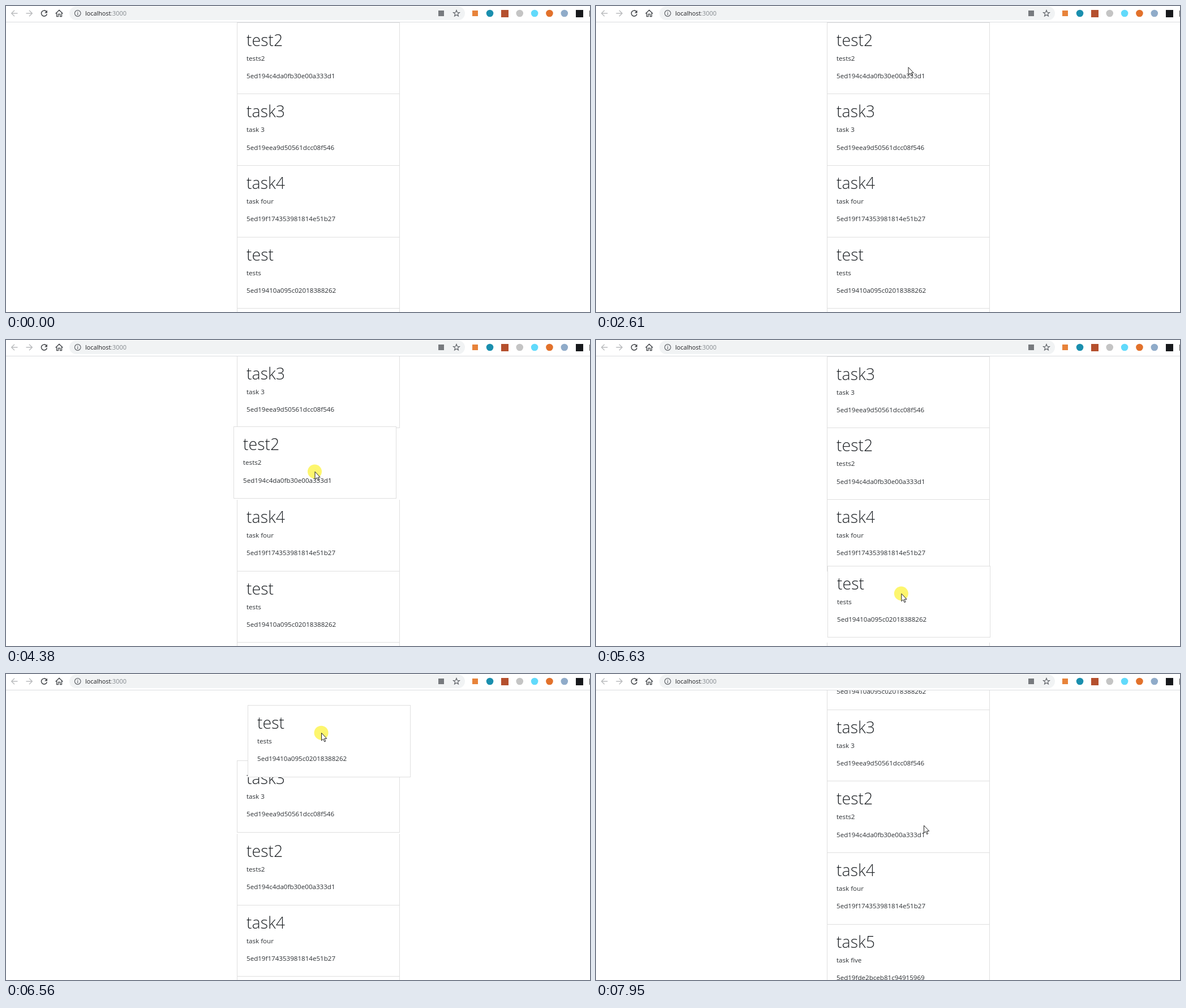
Animation of 1032 by 542 pixels, one loop 8 s. Source, as an HTML page with a canvas:

```html
<!DOCTYPE html>
<html lang="en">
<head>
<meta charset="utf-8">
<title>Sortable task list</title>
<style>
html, body { margin: 0; width: 100%; height: 100%; overflow: hidden; background: #fff; }
canvas { display: block; }
</style>
</head>
<body>
<canvas id="stage" width="1032" height="542"></canvas>
<script>
const ctx = document.getElementById('stage').getContext('2d');
const LOOP = 8000, STEP = 1000 / 13;
const LEFT = 408, TOP = 28.6, PITCH = 126.7, WIDTH = 287;
const SANS = '"Open Sans", "Noto Sans", sans-serif';

const cards = {
  test2: ['test2', 'tests2', '5ed194c4da0fb30e00a333d1'],
  task3: ['task3', 'task 3', '5ed19eea9d50561dcc08f546'],
  task4: ['task4', 'task four', '5ed19f174353981814e51b27'],
  test: ['test', 'tests', '5ed19410a095c02018388262'],
  task5: ['task5', 'task five', '5ed19fde2bceb81c94915969']
};

const key = (t, x, y) => ({ t, x, y });
const path = [
  key(920, 912, 528), key(1700, 533, 341), key(2000, 522, 240), key(2400, 558, 118),
  key(2600, 551.5, 108.2), key(2950, 551.5, 108.2),   // grab the top card
  key(3538, 545.5, 157), key(4385, 545.5, 233), key(4760, 545.5, 233),
  key(5400, 538.5, 458), key(5550, 538.5, 458),       // grab the fourth card
  key(5900, 543, 410), key(6154, 557.5, 174), key(6600, 557, 93),
  key(6840, 557, 93), key(7250, 579, 268)
];

// One phase per list order; shoves maps a slot to the time its card makes room
const phases = [
  { end: 4680, order: ['test2', 'task3', 'task4', 'test', 'task5'],
    slot: 0, press: 2870, lift: 2950, push: -127.4, shoves: { 1: 3780 } },
  { end: 6920, order: ['task3', 'test2', 'task4', 'test', 'task5'],
    slot: 3, press: 5480, lift: 5550, push: PITCH, shoves: { 2: 5900, 1: 6048, 0: 6380 } },
  { end: LOOP, order: ['test', 'task3', 'test2', 'task4', 'task5'],
    press: LOOP, lift: LOOP, shoves: {} }
];

const clamp = v => Math.min(1, Math.max(0, v));

// The screen refreshes 13 times a second
const snap = t => Math.min(Math.floor((t + 15) / STEP) * STEP, LOOP - STEP);

function pointerAt(t) {
  const i = path.findIndex(k => k.t >= t);
  if (i < 0) return path[path.length - 1];
  if (i === 0) return path[0];
  const a = path[i - 1], b = path[i], k = (t - a.t) / (b.t - a.t);
  return { x: a.x + (b.x - a.x) * k, y: a.y + (b.y - a.y) * k };
}

// One notch of the mouse wheel
const notch = (t, from) => 74 * Math.sin(Math.PI / 2 * clamp((t - from) / 150)) ** 2;

// cubic-bezier(.2, 0, 0, 1)
function ease(x) {
  let lo = 0, hi = 1;
  for (let i = 0; i < 24; i++) {
    const s = (lo + hi) / 2;
    if (0.6 * s * (1 - s) ** 2 + s ** 3 < clamp(x)) lo = s; else hi = s;
  }
  return 3 * (1 - lo) * lo * lo + lo ** 3;
}

function text(str, x, y, font, color) {
  ctx.font = font + ' ' + SANS;
  ctx.fillStyle = color;
  ctx.fillText(str, x, y);
}

function rect(x, y, w, h, color) {
  ctx.fillStyle = color;
  ctx.fillRect(x, y, w, h);
}

function disc(x, y, r, color) {
  ctx.fillStyle = color;
  ctx.beginPath();
  ctx.arc(x, y, r, 0, 7);
  ctx.fill();
}

function line(d, color, width) {
  ctx.strokeStyle = color;
  ctx.lineWidth = width;
  ctx.stroke(new Path2D(d));
}

function drawCard(name, x, y, topLine) {
  const l = Math.round(x), t = Math.round(y), b = Math.round(y + PITCH), edge = '#dfdfdf';
  rect(l, t + 1, WIDTH + 1, b - t, '#fff');
  rect(l, t + 1, 1, b - t, edge);
  rect(l + WIDTH, t + 1, 1, b - t, edge);
  rect(l, b, WIDTH + 1, 1, edge);
  if (topLine) rect(l, t, WIDTH + 1, 1, edge);
  const [title, note, id] = cards[name];
  text(title, l + 17, Math.round(y + 42), '300 28.5px', '#212529');
  text(note, l + 17, Math.round(y + 68), '400 11.6px', '#2b2f33');
  text(id, l + 17, Math.round(y + 99.2), '400 11.6px', '#2b2f33');
}

function drawToolbar() {
  rect(0, 0, 1032, 28, '#fff');
  rect(0, 28, 1032, 1, '#dadce0');
  ctx.fillStyle = '#f1f3f4';
  ctx.beginPath();
  ctx.roundRect(112, 1, 699, 24, 12);
  ctx.fill();

  line('M20.5 13H10M15 7.7L9.7 13L15 18.3', '#babcbe', 1.4);
  line('M35.5 13H46M41 7.7L46.3 13L41 18.3', '#babcbe', 1.4);
  line('M71.2 9.6A5 5 0 1 0 72.3 14.2', '#4a4d51', 1.6);
  ctx.fillStyle = '#4a4d51';
  ctx.fill(new Path2D('M73 7.4V12.4H68Z'));
  line('M87.6 13.6L94 7.3L100.4 13.6M89.6 12V18.6H92.4V14.4H95.6V18.6H98.4V12', '#4a4d51', 1.4);
  line('M132 13A5.3 5.3 0 1 1 121.4 13A5.3 5.3 0 1 1 132 13M126.7 12.3V16M126.7 9.9V11.2', '#5f6368', 1.2);

  text('localhost', 140, 17, '400 10.8px', '#202124');
  const w = ctx.measureText('localhost').width;
  text(':3000', 140 + w, 17, '400 10.8px', '#80868b');

  let star = '';
  for (let i = 0; i < 10; i++) {
    const r = i % 2 ? 2.5 : 5.8, a = i * Math.PI / 5 - Math.PI / 2;
    star += (i ? 'L' : 'M') + (796 + r * Math.cos(a)) + ' ' + (13.3 + r * Math.sin(a));
  }
  line(star + 'Z', '#5f6368', 1.2);

  rect(764, 8, 10, 10, '#777a7e');
  const badges = ['#e8833a', '#1a8fae', '#b5502e', '#c4c4c4', '#61dafb', '#e2712b', '#8fabc9', '#17191c'];
  badges.forEach((color, i) => {
    const x = 828.7 + i * 26.35;
    if (i === 0) rect(824, 8, 10, 10, color);
    else if (i === 2 || i === 7) rect(Math.round(x - 6.5), 7, 13, 13, color);
    else disc(x, 13, 6.3, color);
  });
  rect(1031, 8, 1, 11, '#555');
}

function drawPointer({ x, y }, pressed) {
  if (pressed) {
    ctx.globalCompositeOperation = 'multiply';
    disc(x, y, 12.5, '#fdf66e');
    ctx.globalCompositeOperation = 'source-over';
  }
  ctx.save();
  ctx.translate(x, y);
  const arrow = 'M.5 .3V13.8L3.5 10.9L5.7 15.8L7.7 14.9L5.6 10.2H9.7Z';
  ctx.fillStyle = '#fff';
  ctx.fill(new Path2D(arrow));
  line(arrow, '#222', 1);
  ctx.restore();
}

function draw(time) {
  const t = snap(time);
  const phase = phases.find(p => t < p.end);
  const pointer = pointerAt(t);
  const scroll = notch(t, 7258) + notch(t, 7873);
  const lifted = t >= phase.lift;

  rect(0, 0, 1032, 542, '#fff');
  phase.order.forEach((name, i) => {
    if (lifted && i === phase.slot) return;
    const from = phase.shoves[i];
    const shift = from ? phase.push * ease((t - from) / 200) : 0;
    drawCard(name, LEFT, TOP + i * PITCH + shift - scroll, i === 0);
  });
  if (lifted) {
    const grab = pointerAt(phase.lift);
    drawCard(phase.order[phase.slot], LEFT + pointer.x - grab.x,
      TOP + phase.slot * PITCH + pointer.y - grab.y, true);
  }
  drawToolbar();
  if (t >= path[0].t) drawPointer(pointer, t >= phase.press);
}

const start = performance.now();
function tick() {
  draw((performance.now() - start) % LOOP);
  requestAnimationFrame(tick);
}
tick();
</script>
</body>
</html>
```
